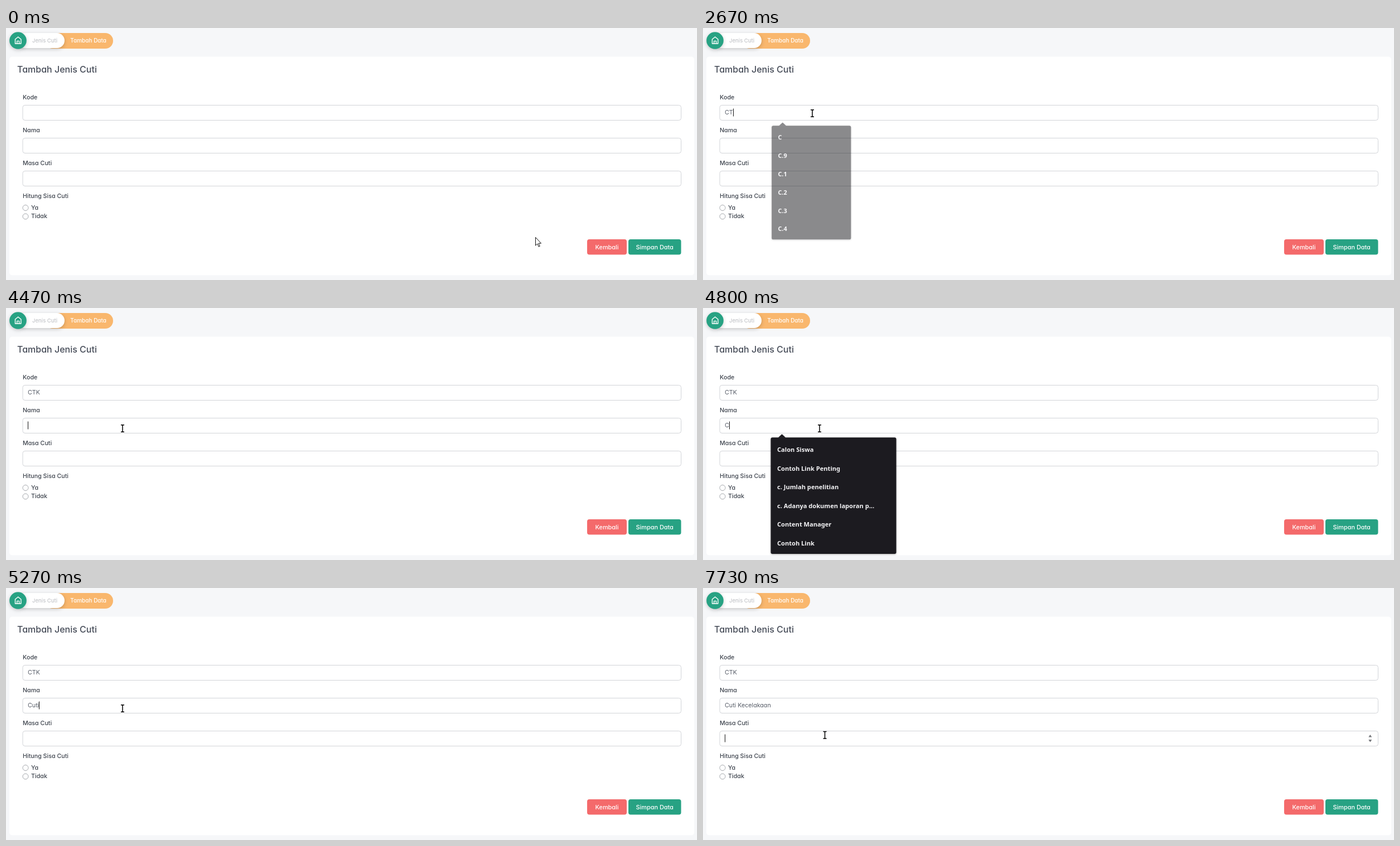
Animation of 1239x452 px, one loop 8000 ms. Source, as an HTML page:

```html
<!DOCTYPE html>
<html lang="id">
<head>
<meta charset="utf-8">
<title>Tambah Jenis Cuti</title>
<style>
  html, body { margin: 0; height: 100%; overflow: hidden; background: #f6f7f9; }
  svg { display: block; }
  text { white-space: pre; font: 500 10.7px Inter, sans-serif; font-feature-settings: "cv11"; fill: #3c424c; }
  .title { font-size: 16px; fill: #464c58; }
  .crumb { font-size: 9.5px; fill: #c3c5c9; }
  .current { font-size: 10px; fill: #fff; }
  .button { font-size: 10.9px; fill: #fff; text-anchor: middle; }
  .value { font-weight: 400; fill: #555b66; }
  .popup text { font: 600 11.1px "Noto Sans", "Open Sans", sans-serif; fill: #f4f4f6; }
  .popup, .soft { filter: drop-shadow(0 1px 1.5px #0005); }
  .soft { filter: drop-shadow(0 2px 3px #0003); }
  .field { fill: #fff; stroke: #d2d4d8; }
  .radio { fill: #fff; stroke: #a5a8ad; }
</style>
</head>
<body>
<svg id="stage" width="1239" height="452" viewBox="0 0 1239 452">
  <rect x="6" y="51.5" width="1228" height="392" rx="5" fill="#fff"/>
  <rect x="70" y="9" width="122" height="28" rx="14" fill="#f9b76d"/>
  <rect class="soft" x="20" y="9" width="85" height="27" rx="13.5" fill="#fff"/>
  <circle class="soft" cx="21.5" cy="22.5" r="15.3" fill="#27a283"/>
  <path d="M16.5 20.3 21.7 16l5.2 4.3V28H16.5zM19.8 28v-4.6h3.8V28" fill="none" stroke="#fff" stroke-width="1.4" stroke-linejoin="round"/>
  <text class="crumb" x="47" y="25.6">Jenis Cuti</text>
  <text class="current" x="115.3" y="25.8">Tambah Data</text>
  <text class="title" x="20" y="80">Tambah Jenis Cuti</text>
  <g id="form"></g>
  <text x="30" y="305.2">Hitung Sisa Cuti</text>
  <circle class="radio" cx="35" cy="322.5" r="5"/>
  <text x="45" y="326.3">Ya</text>
  <circle class="radio" cx="35" cy="338" r="5"/>
  <text x="45" y="341.4">Tidak</text>
  <rect x="1042" y="379" width="71" height="27.5" rx="4" fill="#f46a6b"/>
  <text class="button" x="1077.5" y="396.5">Kembali</text>
  <rect x="1116" y="379" width="94.5" height="27.5" rx="4" fill="#27a283"/>
  <text class="button" x="1163.2" y="396.5">Simpan Data</text>
  <path id="spinner" d="M1193.3 267.5h6l-3-4.5zM1193.3 272h6l-3 4.5z" fill="#75777b"/>
  <path id="caret" stroke="#111"/>
  <g id="popups"></g>
  <path id="arrow" d="M0 0V14.6L3.3 11.5 5.6 16.8 7.7 15.9 5.4 10.7H10z" fill="#fff" stroke="#111"/>
  <path id="beam" d="M-3-6.2H-.8L0-5.6.8-6.2H3M0-5.8V5.8M-3 6.2H-.8L0 5.6.8 6.2H3" fill="none" stroke="#000" stroke-width="1.5"/>
</svg>
<script>
const $ = id => document.getElementById(id);
const FPS = 15, LOOP = 8000;
const FIELD_X = 39, FIELD_TOPS = [138.5, 197.5, 256.5], FIELD_HEIGHT = 27;

$('form').innerHTML = ['Kode', 'Nama', 'Masa Cuti'].map((label, i) => {
  const top = FIELD_TOPS[i];
  return `<text x="30" y="${top - 10.5}">${label}</text>
    <rect class="field" x="30" y="${top}" width="1180.5" height="${FIELD_HEIGHT}" rx="4"/>
    <text class="value" x="${FIELD_X}" y="${top + 16.4}"></text>`;
}).join('');
const values = [...document.querySelectorAll('.value')];

// Times below are in ticks of 1/15 s.
const typing = [
  { text: 'CTK', keys: [17, 39, 43] },
  { text: 'Cuti Kecelakaan', keys: [72, 76, 78, 79, 81, 83, 86, 90, 92, 93, 95, 97, 98, 100, 102] },
  { text: '', keys: [] },
];
const focusTimes = [11, 67, 116];
const moves = [
  { start: 0, end: 10, from: [949.5, 375.5], to: [196, 153] },
  { start: 60, end: 65, from: [196, 153], to: [209, 216] },
  { start: 112, end: 115, from: [209, 216], to: [218.5, 263.7] },
];
const popups = [
  { top: 173, width: 145.5, open: 17, close: 39, fades: true,
    rows: ['C', 'C.9', 'C.1', 'C.2', 'C.3', 'C.4'] },
  { top: 232.3, width: 207.5, open: 68, close: 71,
    rows: ['Calon Siswa', 'Contoh Link Penting', 'c. Jumlah penelitian',
      'c. Jumlah laporan penelitian', 'Content Manager', 'Contoh Link'] },
  { top: 232.3, width: 225, open: 72, close: 76, fades: true,
    rows: ['Calon Siswa', 'Contoh Link Penting', 'c. Jumlah penelitian',
      'c. Adanya dokumen laporan p...', 'Content Manager', 'Contoh Link'] },
];
const POPUP_X = 121.5, POPUP_HEIGHT = 208.8;

$('popups').innerHTML = popups.map(({ top, width, rows }) => `<g class="popup">
  <rect x="${POPUP_X}" y="${top}" width="${width}" height="${POPUP_HEIGHT}" rx="3" fill="#1c1b20"/>
  <path d="M134.5 ${top + .5}l7-6.5 7 6.5z" fill="#1c1b20"/>
  ${rows.map((row, i) => `<text x="133" y="${top + 25.6 + i * 33.6}">${row}</text>`).join('')}
</g>`).join('');
const popupNodes = [...$('popups').children];

const clamp = x => Math.min(1, Math.max(0, x));
const ease = x => x * x * (3 - 2 * x);
const show = (node, on) => node.style.display = on ? '' : 'none';

function drawPopup(popup, node, tick) {
  const fade = Math.max(0, tick - popup.close);
  const opacity = fade ? (popup.fades ? [0, .51, .12][fade] || 0 : 0) : 1;
  show(node, tick >= popup.open && opacity > 0);
  const scale = 1 - .023 * fade;
  const cx = POPUP_X + popup.width / 2, cy = popup.top + POPUP_HEIGHT / 2 - 2;
  node.setAttribute('opacity', opacity);
  node.setAttribute('transform', `translate(${cx} ${cy}) scale(${scale}) translate(${-cx} ${-cy})`);
}

function drawCaret(tick) {
  const field = focusTimes.filter(time => tick >= time).length - 1;
  show($('caret'), false);
  if (field < 0) return;
  const lastKey = Math.max(focusTimes[field], ...typing[field].keys.filter(key => key <= tick));
  const x = Math.round(FIELD_X + values[field].getComputedTextLength()) + .5;
  $('caret').setAttribute('d', `M${x} ${FIELD_TOPS[field] + 6}v14`);
  show($('caret'), (tick - lastKey) % 16 < 8);
}

function drawPointer(tick) {
  const move = moves.filter(m => tick >= m.start).pop();
  const k = ease(clamp((tick - move.start) / (move.end - move.start)));
  const [x, y] = move.from.map((a, i) => a + (move.to[i] - a) * k);
  const hovered = FIELD_TOPS.findIndex(top => y >= top && y <= top + FIELD_HEIGHT);
  for (const id of ['arrow', 'beam']) {
    $(id).setAttribute('transform', `translate(${x} ${y})`);
    show($(id), (id === 'beam') === (hovered >= 0));
  }
  show($('spinner'), hovered === 2);
}

function draw() {
  const time = performance.now() % LOOP;
  const tick = Math.floor((time + 4) * FPS / 1000) % (LOOP * FPS / 1000);
  typing.forEach(({ text, keys }, i) => {
    values[i].textContent = text.slice(0, keys.filter(key => key <= tick).length);
  });
  popups.forEach((popup, i) => drawPopup(popup, popupNodes[i], tick));
  drawCaret(tick);
  drawPointer(tick);
  requestAnimationFrame(draw);
}
draw();
</script>
</body>
</html>
```
